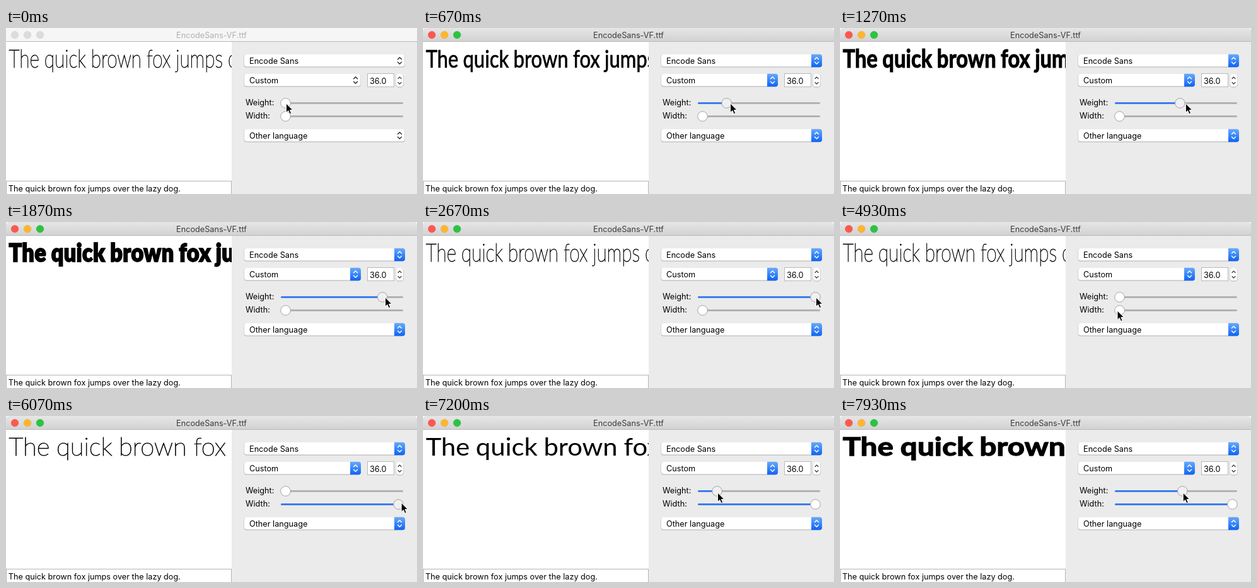
An HTML page that plays this animation: 652x264 px, repeating every 8000 ms.

```html
<!DOCTYPE html>
<html lang="en">
<head>
<meta charset="utf-8">
<title>Variable font preview</title>
<style>
html, body { margin: 0; width: 100%; height: 100%; overflow: hidden; background: #fff; }
svg { display: block; width: 652px; height: 264px; }
text { font: 12.7px Inter, "Liberation Sans", sans-serif; fill: #000; }
#preview { font: 100 39.5px Lato, "Open Sans", sans-serif; stroke: #000; word-spacing: -.8px; }
.box { fill: #fff; }
.shadow { fill: #adadad; }
.chevrons { fill: none; stroke: #fff; stroke-width: 1.5; stroke-linecap: round; stroke-linejoin: round; }
.track { fill: #b2b2b2; }
.filled { fill: #3b7df0; }
.knob { fill: #fff; stroke: #999; stroke-width: .9; }
.knob.pressed { fill: #f0f0f0; }
#title { text-anchor: middle; fill: #3c3c3c; }
.inactive #title { fill: #b0b0b0; }
.inactive #bar { fill: #f6f6f6; }
.inactive #lights circle { fill: #dcdcdc; stroke: #cecece; }
.inactive .cap { display: none; }
.inactive .popup .chevrons, .stepper .chevrons { stroke: #333; }
.stepper .chevrons { stroke-width: 1.2; }
</style>
</head>
<body>
<svg id="stage" viewBox="0 0 652 264">
  <defs>
    <linearGradient id="barFill" x2="0" y2="1"><stop stop-color="#e6e6e6"/><stop offset="1" stop-color="#d1d1d1"/></linearGradient>
    <linearGradient id="blue" x2="0" y2="1"><stop stop-color="#68aafa"/><stop offset="1" stop-color="#0d63f6"/></linearGradient>
    <clipPath id="pane"><rect y="22" width="358" height="221"/></clipPath>
  </defs>
  <rect y="21" width="652" height="243" fill="#ebebeb"/>
  <path id="bar" d="M0 22V5q0-5 5-5H647q5 0 5 5V22z" fill="url(#barFill)"/>
  <path d="M0 21.5H652" stroke="#b9b9b9"/>
  <g id="lights" stroke-width=".6">
    <circle cx="14" cy="11" r="5.8" fill="#fc5850" stroke="#ee504a"/>
    <circle cx="34" cy="11" r="5.8" fill="#fdb62e" stroke="#eca92c"/>
    <circle cx="54" cy="11" r="5.8" fill="#2ac440" stroke="#27b53a"/>
  </g>
  <text id="title" x="326" y="16">EncodeSans-VF.ttf</text>

  <rect y="22" width="358" height="242" fill="#fff"/>
  <g clip-path="url(#pane)"><text id="preview">The quick brown fox jumps over the lazy dog.</text></g>
  <rect x=".5" y="243.5" width="357" height="21" fill="#fff" stroke="#b4b4b4"/>
  <text x="3.8" y="260">The quick brown fox jumps over the lazy dog.</text>

  <g id="controls"></g>
  <rect x="573.5" y="72.5" width="42" height="21" fill="#fff" stroke="#b9b9b9"/>
  <text x="577" y="88.7">36.0</text>
  <g class="stepper">
    <rect class="shadow" x="618" y="73" width="13" height="21.5" rx="5"/>
    <rect class="box" x="618.5" y="73" width="12" height="20.5" rx="4.5"/>
    <path class="chevrons" d="M622 80.5l2.5-2.6 2.5 2.6M622 86.5l2.5 2.6 2.5-2.6"/>
  </g>
  <path id="cursor" d="M0 0V14.5L3.3 11.4 5.6 16.7 8.1 15.6 5.8 10.5H10.4Z" fill="#000" stroke="#fff" stroke-linejoin="round"/>
</svg>
<script>
const LOOP = 8000, STEP = 1000 / 15, EM = 39.5;
const KNOB_LEFT = 443.5, KNOB_TRAVEL = 179;
const $ = id => document.getElementById(id);

const popup = (label, y, right) => `<g class="popup">
  <rect class="shadow" x="377.6" y="${y + .3}" width="${right - 377.8}" height="20.2" rx="4"/>
  <rect class="box" x="378" y="${y}" width="${right - 378.5}" height="19.6" rx="4"/>
  <path class="cap" fill="url(#blue)" d="M${right - 17} ${y - .3}h13q4 0 4 4v12.6q0 4-4 4h-13z"/>
  <path class="chevrons" d="M${right - 11.5} ${y + 7.7}l3-3 3 3m-6 4.6l3 3 3-3"/>
  <text x="386" y="${y + 14.7}">${label}</text></g>`;

const slider = (id, label, y) => `<g id="${id}">
  <text x="380" y="${y + 3.5}">${label}</text>
  <rect class="track" x="436" y="${y - 1.5}" width="194" height="3" rx="1.5"/>
  <rect class="filled" x="436" y="${y - 1.5}" height="3" rx="1.5"/>
  <circle class="knob" cy="${y}" r="7.8"/></g>`;

$('controls').innerHTML =
  popup('Encode Sans', 42, 633) + popup('Custom', 73, 563) + popup('Other language', 161, 633) +
  slider('weight', 'Weight:', 119.5) + slider('width', 'Width:', 140.5);

function setSlider(id, value, pressed) {
  const group = $(id), x = KNOB_LEFT + value * KNOB_TRAVEL;
  const knob = group.querySelector('.knob');
  knob.setAttribute('cx', x);
  knob.classList.toggle('pressed', pressed);
  group.querySelector('.filled').setAttribute('width', value > 0 ? x - 436 : 0);
}

// Stem thickness in em of a static font weight; a stroke fills the gaps between weights
const stemOf = fontWeight => .02 + .0175 * (fontWeight - 100) / 100;

function setPreview(weight, width) {
  if (weight >= 1) weight = 0; // the top of the axis falls back to the default
  const stem = .043 + .24 * weight - .06 * weight * weight;
  const fontWeight = [900, 700, 400, 300, 100].find(w => stemOf(w) <= stem);
  const stroke = (stem - stemOf(fontWeight)) * EM;
  const scale = .757 + .258 * width + weight * (.127 + .2 * width);
  const preview = $('preview');
  preview.style.fontWeight = fontWeight;
  preview.style.strokeWidth = stroke + 'px';
  preview.style.letterSpacing = .3 * weight * stroke + 'px';
  preview.setAttribute('transform', `translate(4.4 63) scale(${scale} 1)`);
}

function render(elapsed) {
  const time = Math.floor((elapsed % LOOP) / STEP + .01) * STEP;
  const ramp = (from, to) => Math.min(1, Math.max(0, (time - from) / (to - from)));
  const bump = (from, to) => Math.sin(Math.PI * ramp(from, to));

  const weight = ramp(270, 2130) - ramp(2860, 4490) + .6 * ramp(7000, 7933);
  const width = ramp(5130, 6000);
  const back = ramp(6400, 6900);

  // The pointer follows the dragged knob, runs ahead of it and overshoots at the ends
  const drift = 8 * bump(270, 2130) + 12 * bump(2670, 2930) - 4.5 * bump(4500, 5300) + 12 * bump(6030, 6400);
  const x = KNOB_LEFT + (weight + width - back) * KNOB_TRAVEL + 1 + drift;
  const y = 120 + 23 * ramp(4500, 4900) - 5 * width - 16 * ramp(6200, 6900);

  $('stage').classList.toggle('inactive', time < 60);
  setSlider('weight', weight, time > 200 && time < 4550 || time > 6950);
  setSlider('width', width, time > 5070 && time < 6120);
  setPreview(weight, width);
  $('cursor').setAttribute('transform', `translate(${x} ${y})`);
}

const start = performance.now();
function tick() {
  render(performance.now() - start);
  requestAnimationFrame(tick);
}
tick();
</script>
</body>
</html>
```
